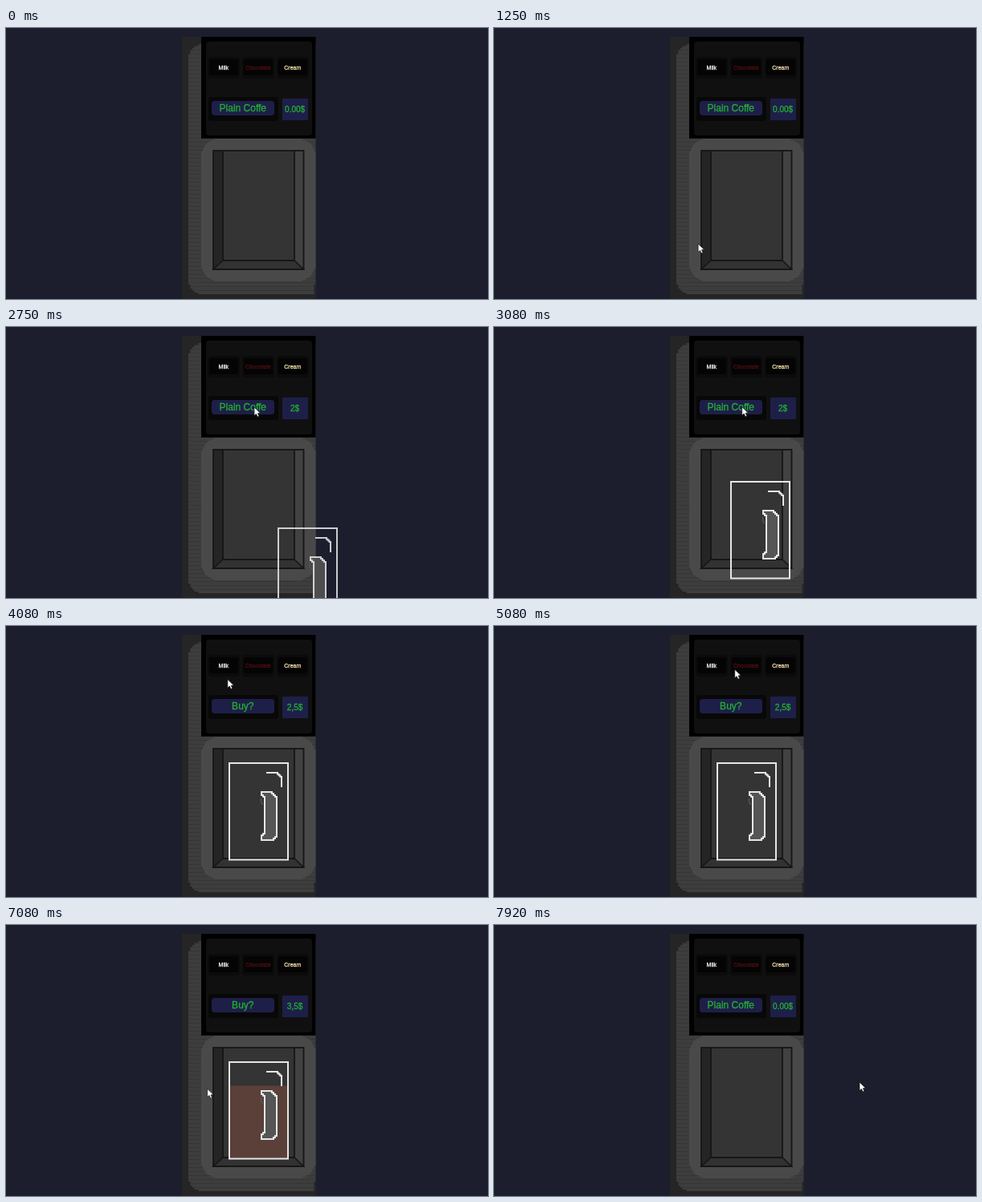
These frames come from a looping animation (600 px wide and 338 px high, 8000 ms). An HTML page with a canvas:

```html
<!DOCTYPE html>
<html lang="en">
<head>
<meta charset="utf-8">
<title>Coffee machine</title>
<style>
  html, body { margin: 0; width: 100%; height: 100%; overflow: hidden; background: #1c1e2d; }
  canvas { display: block; width: 100%; height: 100%; }
</style>
</head>
<body>
<canvas id="stage" width="600" height="338"></canvas>
<script>
const ctx = document.getElementById('stage').getContext('2d');
const LOOP = 8000;
const GREEN = '#22b033';
const BASE = '#252525';
const BLUE = '#1e1f49';

const time = { serve: 1960, cupIn: 2170, askBuy: 3600, milk: 3880, chocolate: 5230, pour: 6000, take: 7660 };

// Each glide: start, end, and where the pointer comes to rest
const GLIDES = [
  [250, 330, 250, 333],
  [400, 850, 234, 331],
  [850, 2030, 309, 100],
  [3050, 3700, 271, 51],
  [3900, 4100, 276, 67],
  [4550, 5200, 302, 53],
  [5230, 5700, 285, 108],
  [6050, 6400, 290, 121],
  [6450, 7000, 250, 204],
  [7050, 7550, 304, 222],
  [7600, 7920, 455, 196]
];

const progress = (t, from, to) => Math.min(1, Math.max(0, (t - from) / (to - from)));
const mix = (a, b, u) => a + (b - a) * u;
const smooth = (u) => u * u * (3 - 2 * u);
const easeInOut = (u, power) => u < .5 ? (2 * u) ** power / 2 : 1 - (2 - 2 * u) ** power / 2;

function box(x, y, w, h, color, radius = 0) {
  ctx.fillStyle = color;
  ctx.beginPath();
  ctx.roundRect(x, y, w, h, radius);
  ctx.fill();
}

// Rounded rectangle whose corners climb in visible steps
function steppedBox(x, y, w, h, r, color, step) {
  ctx.fillStyle = color;
  for (let row = 0; row < h; row += step) {
    const edge = Math.max(0, r - Math.min(row + step / 2, h - row - step / 2));
    const inset = Math.round((r - Math.sqrt(r * r - edge * edge)) / step) * step;
    ctx.fillRect(x + inset, y + row, w - 2 * inset, Math.min(step, h - row));
  }
}

function line(points, color, width, close = false, fill) {
  ctx.beginPath();
  points.forEach(([x, y]) => ctx.lineTo(x, y));
  if (close) ctx.closePath();
  if (fill) { ctx.fillStyle = fill; ctx.fill(); }
  ctx.strokeStyle = color;
  ctx.lineWidth = width;
  ctx.stroke();
}

// Turns the diagonals of a path into small stairs
function stairs(points, step = 2) {
  return points.flatMap(([x, y], i) => {
    if (i === 0) return [[x, y]];
    const [px, py] = points[i - 1];
    const count = Math.max(1, Math.round(Math.min(Math.abs(x - px), Math.abs(y - py)) / step));
    return Array.from({ length: count }, (_, k) => {
      const stepY = mix(py, y, (k + 1) / count);
      return [[mix(px, x, k / count), stepY], [mix(px, x, (k + 1) / count), stepY]];
    }).flat();
  });
}

function label(text, x, baseline, size, color) {
  ctx.font = `${size}px "Liberation Sans", Arial, sans-serif`;
  ctx.textAlign = 'center';
  ctx.fillStyle = ctx.strokeStyle = color;
  ctx.lineWidth = .3;
  ctx.fillText(text, x, baseline);
  ctx.strokeText(text, x, baseline);
}

function drawBay() {
  const ink = '#161616';
  steppedBox(243, 138, 142.5, 178, 23, '#494949', 2);
  box(258, 153, 112.5, 148, '#343434');
  box(258, 153, 12, 148, BASE);
  box(359, 153, 11, 148, '#424242');
  line([[258, 301], [270, 290], [359, 290], [370.5, 301]], ink, 1.6, true, '#323232');
  line([[270, 153], [270, 290], [359, 290], [359, 153]], ink, 1.8);
  ctx.strokeRect(258, 153, 112.5, 148);
}

function drawButtons() {
  const buttons = [['Milk', '#f4f4f4'], ['Chocolate', '#4d0f12'], ['Cream', '#f3dfa8']];
  buttons.forEach(([text, color], i) => {
    const x = 253 + 43 * i;
    box(x - 2, 36, 40, 27, '#0b0b0b', 3);
    box(x, 39, 36, 20, '#040404', 3);
    label(text, x + 17.8, 51.5, 7, color);
  });
}

function drawMachine(message, price) {
  box(219, 11, 166.5, 327, BASE);
  ctx.save();
  ctx.beginPath();
  ctx.rect(219, 11, 166.5, 327);
  ctx.clip();
  steppedBox(227, 20, 180, 312, 19, '#3d3d3d', 2.5);
  ctx.restore();
  box(383.5, 320, 2, 12, BASE);
  drawBay();
  box(243, 11, 142.5, 126.7, '#000');
  box(249, 17, 132, 117, '#101010', 4);
  drawButtons();
  box(252, 86, 87, 30, '#080808', 3);
  box(256, 91, 78, 18, BLUE, 4);
  box(344, 88, 32, 27, BLUE, 1);
  label(message, 294.8, 104.3, 12, GREEN);
  label(price, 359.6, 105, 10, GREEN);
}

function drawHandle(ink) {
  const [left, grip, right, top, bottom, bevel] = [41, 45, 60, 37, 97, 6];
  const lip = grip - left;
  line(stairs([
    [left, top], [right - bevel, top], [right, top + bevel],
    [right, bottom - bevel], [right - bevel, bottom], [left, bottom],
    [left, bottom - lip], [grip, bottom - 2 * lip], [grip, top + 2 * lip],
    [left, top + lip], [left, top]
  ]), ink, 2, true, '#555');
}

function drawCup(t) {
  const ink = '#e6e6e6';
  const slide = easeInOut(progress(t, 2380, 3530), 3);
  const level = 101 * easeInOut(progress(t, time.pour, time.pour + 1400), 2);
  ctx.save();
  ctx.globalAlpha = mix(.15, 1, progress(t, time.cupIn, 2850)) * (1 - progress(t, 7580, 7740));
  ctx.translate(Math.round(mix(348, 277, slide)), Math.round(mix(262, 170, slide)));
  box(2, 121 - level, 72, level, '#5a4038');
  line([[1, 1], [74, 1], [74, 121.5], [1, 121.5]], ink, 2, true);
  line(stairs([[47, 13], [61, 13], [66, 18], [66, 31]]), ink, 2);
  line([[40.5, 45], [40.5, 49], [42.5, 53]], '#555', 1.5);
  drawHandle(ink);
  ctx.restore();
}

function drawPointer(t) {
  if (t < GLIDES[0][0]) return;
  const [x, y] = GLIDES.reduce(([px, py], [from, to, toX, toY]) => {
    const u = smooth(progress(t, from, to));
    return [mix(px, toX, u), mix(py, toY, u)];
  }, [251, 340]);
  ctx.save();
  ctx.translate(x, y);
  line([[0, 0], [0, 10.6], [2.4, 8.4], [4.1, 12], [6, 11.2], [4.4, 7.7], [7.6, 7.4]],
    '#111', .7, true, '#fff');
  ctx.restore();
}

function priceAt(t) {
  if (t < time.serve || t >= time.take) return '0.00$';
  if (t < time.milk) return '2$';
  return t < time.chocolate ? '2,5$' : '3,5$';
}

function draw(t) {
  box(0, 0, 600, 338, '#1c1e2d');
  drawMachine(t >= time.askBuy && t < time.take ? 'Buy?' : 'Plain Coffe', priceAt(t));
  if (t >= time.cupIn) drawCup(t);
  drawPointer(t);
}

const start = performance.now();
function tick() {
  draw((performance.now() - start) % LOOP);
  requestAnimationFrame(tick);
}
tick();
</script>
</body>
</html>
```
